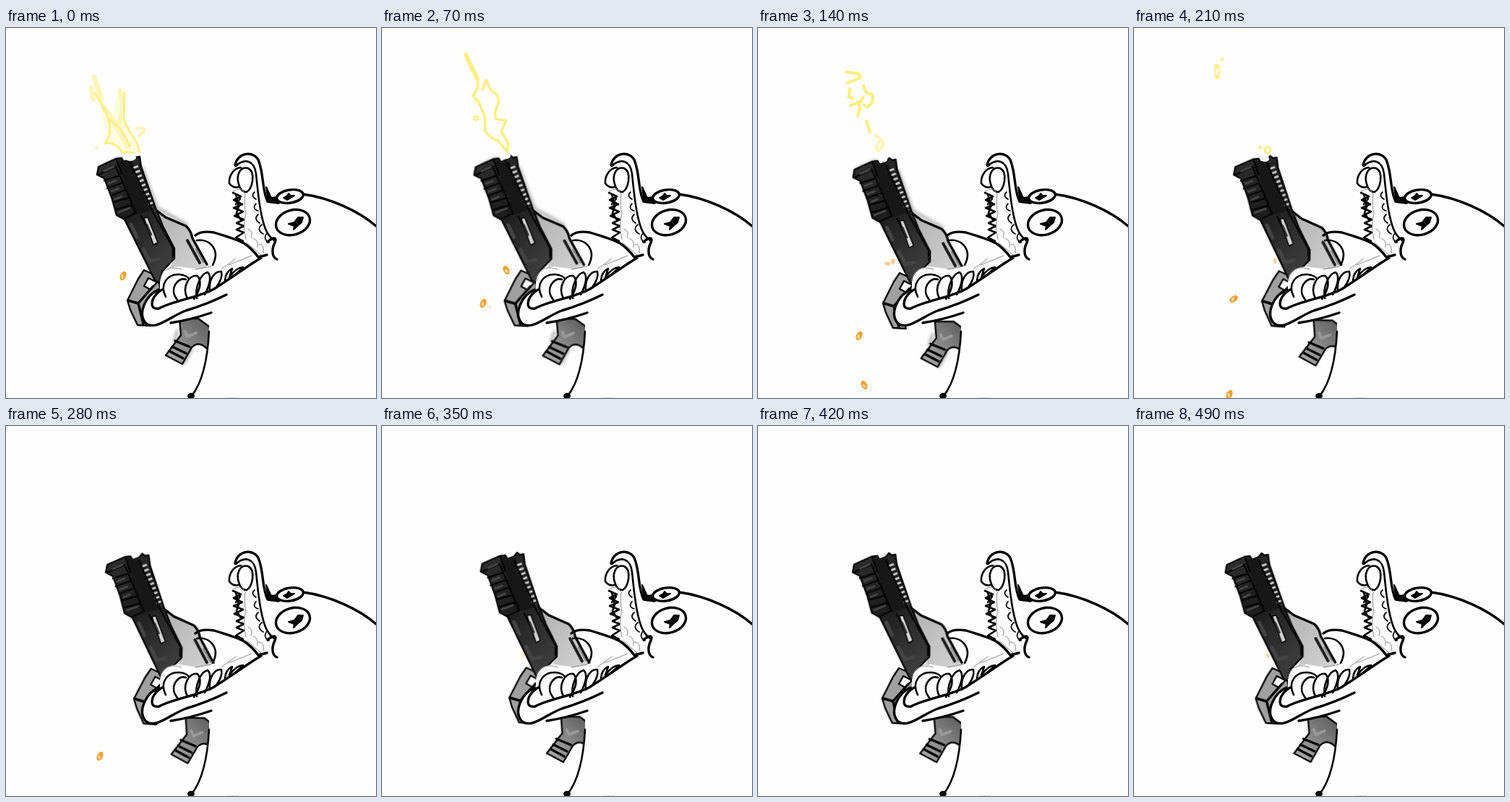
Animation, 512 px wide and 512 px high, one loop 560 ms. Source, as an HTML page:

```html
<!DOCTYPE html>
<html lang="en">
<head>
<meta charset="utf-8">
<title>Recoil</title>
<style>
html, body { margin: 0; width: 100%; height: 100%; overflow: hidden; background: #fefefe; }
svg { display: block; width: 100%; height: 100%; }
path, ellipse { stroke-linecap: round; stroke-linejoin: round; }

.ink { fill: none; stroke: #000; stroke-width: 3.4; }
.ink .mid { stroke-width: 2.6; }
.ink .small { stroke-width: 1.7; }
.ink .thin { stroke-width: 1; stroke: #888; }
.ink .solid { fill: #000; stroke-width: 2; }
.white, .ink .white { fill: #fefefe; }
.edge { stroke: #080808; stroke-width: 2.4; }

.gun { transform-origin: 200px 350px; animation: kick 560ms step-end infinite; }
@keyframes kick {
  0%    { transform: none; }
  12.5% { transform: translate(1.5px, .5px); }
  25%   { transform: translate(5px, 4px) rotate(.2deg); }
  37.5% { transform: translate(9.5px, 1.5px) rotate(1deg); }
  50%   { transform: translate(9.5px, 1px) rotate(1deg); }
  62.5% { transform: translate(8.5px, -.5px) rotate(.8deg); }
  75%   { transform: translate(4px, 0) rotate(.4deg); }
  87.5%, 100% { transform: translate(.5px, 0); }
}
.halo { animation: halo 560ms step-end infinite; }
@keyframes halo { 0% { visibility: visible; } 37.5%, 100% { visibility: hidden; } }

.beat { visibility: hidden; animation: beat 560ms step-end calc(var(--i) * 70ms - 560ms) infinite; }
@keyframes beat { 0% { visibility: visible; } 12.5%, 100% { visibility: hidden; } }

.fire { fill: none; stroke: #fcee84; stroke-width: 4.4; filter: url(#soft); }
.fire .pale { stroke: #fdf5b8; }
.fire .fill { fill: #fffbe0; stroke: none; }
.fire .flash { fill: #fff; stroke: none; }
.shell { fill: #f6a033; filter: url(#soft); }
</style>
</head>
<body>
<svg viewBox="0 0 512 512">
  <defs>
    <filter id="soft" x="-50%" y="-50%" width="200%" height="200%"><feGaussianBlur stdDeviation=".7"/></filter>
    <filter id="blur" x="-20%" y="-20%" width="140%" height="140%"><feGaussianBlur stdDeviation="2"/></filter>
    <linearGradient id="barrel" x1="0" y1="0" x2=".6" y2="1">
      <stop offset="0" stop-color="#303030"/><stop offset=".5" stop-color="#1d1d1d"/><stop offset="1" stop-color="#3b3b3b"/>
    </linearGradient>
    <linearGradient id="stock" x1="0" y1="0" x2=".7" y2="1">
      <stop offset="0" stop-color="#b0b0b0"/><stop offset="1" stop-color="#d2d2d2"/>
    </linearGradient>
    <linearGradient id="grip" x1="1" y1="0" x2="0" y2="1">
      <stop offset="0" stop-color="#555"/><stop offset=".5" stop-color="#858585"/><stop offset="1" stop-color="#b0b0b0"/>
    </linearGradient>
    <g id="casing"><ellipse rx="4" ry="6.5" transform="rotate(25)"/><ellipse cx="-1" cy="1" rx="1.6" ry="3" fill="#fbdc9a"/></g>
  </defs>

  <g class="gun">
    <g class="halo" fill="none" stroke="#888" stroke-width="4" opacity=".7" filter="url(#blur)">
      <path d="M137 188L158 180M188 193L209 249L250 272M237 420L233 434M246 464L257 444"/>
    </g>

    <!-- magazine -->
    <path class="edge" fill="#a0a0a0" d="M191 335L183 347L168 377L172 390L182 411L200 412L192 386L214 366L211 344Z"/>
    <path class="white edge" d="M197 346L191 357L200 362L209 352Z"/>
    <path class="ink mid" d="M169 377L183 381L204 357M183 381L190 409"/>

    <!-- grip -->
    <path fill="url(#grip)" class="edge" d="M240 402L242 425L221 453L244 465L257 442Q268 431 281 447L285 416L266 402Z"/>
    <path class="ink mid" d="M234 433L254 441M230 441L249 450M226 447L245 457"/>
    <path fill="none" stroke="#9a9a9a" stroke-width="4" d="M248 420L251 427L263 422"/>

    <!-- stock -->
    <path fill="url(#stock)" d="M205 250L221 262L251 275L258 291L279 327L270 346L218 352L233 318Z"/>
    <path class="ink mid" d="M205 250L221 262L249 274Q256 280 258 291L278 327"/>
    <path fill="none" stroke="#1b1b1b" stroke-width="4" d="M251 294L268 325"/>
    <path fill="none" stroke="#888" stroke-width="2.5" d="M263 306L273 324"/>

    <!-- barrel -->
    <path fill="url(#barrel)" class="edge" d="M126 203L128 192L152 181L160 180L163 185L172 181L176 176L180 179L185 178L187 192L207 249L217 274L233 305L233 319L216 337L212 353L206 349L191 319L164 265L153 259L146 234L136 208Z"/>
    <path fill="#171717" d="M155 183L174 184L203 251L176 259Z"/>
    <path fill="none" stroke="#c6c6c6" stroke-width="7" stroke-dasharray="3 3.8" style="stroke-linecap:butt" d="M179 191L202 248"/>
    <path fill="none" stroke="#050505" stroke-width="2.4" d="M128 203L152 192L180 256L163 264M136 211L157 204M140 222L161 214M145 232L166 224M149 241L170 235M153 251L174 245M172 187L204 256M153 182L160 202"/>
    <path fill="none" stroke="#484848" stroke-width="2.5" d="M136 198L149 192M142 215L152 211M146 226L156 222M151 237L160 233M156 255L171 249"/>
    <path fill="none" stroke="#444" stroke-width="5" d="M173 272L181 289M190 306L199 323L211 320"/>
    <path fill="none" stroke="#060606" stroke-width="2.5" d="M187 260L207 299M204 256L231 304L231 317"/>
    <path fill="#d6d6d6" stroke="#050505" stroke-width="1.5" d="M191 263L196 262L210 297L204 300Z"/>
    <path stroke="#333" stroke-width="2.5" d="M195 272L201 286"/>
  </g>

  <!-- lower jaw -->
  <path class="white" d="M213 349Q218 331 239 330L266 334L290 328L330 320L350 318L303 371L284 394L236 408Q207 416 194 409Q182 395 194 374L213 364Z"/>
  <g class="ink">
    <path d="M262 287Q270 280 288 283C303 288 320 292 331 299Q341 306 349 317L361 314"/>
    <path class="mid" d="M264 294C282 291 297 307 286 328"/>
    <path d="M353 318C330 332 312 346 288 361C264 374 232 377 212 388Q199 390 203 376Q207 367 216 362"/>
    <path d="M211 362C193 370 182 395 193 408C207 420 227 399 249 391Q279 382 305 369"/>
    <path d="M228 408Q255 404 284 394"/>
    <path class="thin" d="M214 350C213 335 227 328 243 334M262 334L284 330M299 333L318 319M308 328L340 315"/>
    <path class="mid" d="M221 372C212 354 224 340 240 341Q250 342 253 347M237 376C225 362 237 344 249 348M251 374C243 359 253 341 265 343Q274 354 260 375M264 374C261 360 269 340 279 338Q287 345 275 369M282 365C280 349 288 336 298 337Q300 346 292 357M303 349Q304 337 313 333L309 345Q319 331 328 331L318 341"/>
  </g>

  <!-- head -->
  <g class="ink">
    <path d="M317 190C320 171 345 169 350 185C357 204 354 224 362 240L377 242"/>
    <path class="mid" d="M318 191C331 179 344 184 346 202C349 232 352 260 359 278Q363 288 371 294"/>
    <path class="mid" d="M325 193C314 194 308 206 309 215Q314 222 322 220M323 219C317 204 324 191 335 194C346 200 341 222 333 227Q326 227 323 219"/>
    <path class="mid" d="M314 228L325 233L315 238L327 244L315 249L328 254L316 260L329 265L319 270L329 274L319 279L329 283L318 290L328 295M318 230L322 247L319 256L326 267M324 236L318 244"/>
    <path class="thin" d="M314 226Q327 218 330 229M331 229Q329 244 332 257Q327 272 332 292M335 278q8 3 4 12M342 291q8 2 6 13M350 299q8 0 6 12M333 297L353 314"/>
    <path class="small" d="M344 227q-6 5 2 10M346 243q-6 7 3 10M349 258q-7 6 2 12M354 272q-8 7 2 13M361 284q-6 8 3 13"/>
    <path d="M362 296C371 288 376 290 371 299C367 309 369 318 375 320"/>
    <path class="solid" d="M360 220L367 235L374 234L378 242L363 241Z"/>
    <path d="M411 230C449 235 489 254 512 274"/>
    <ellipse class="white" cx="393" cy="233" rx="18.5" ry="9" transform="rotate(-9 393 233)"/>
    <ellipse class="white" cx="397" cy="269" rx="24" ry="17" transform="rotate(-16 397 269)"/>
    <path class="solid" d="M391 271L399 269L404 262L411 262L409 269L403 274L398 279L399 274Z"/>
    <path class="solid" d="M384 235L389 232L391 229L394 232L399 232L394 235L389 238Z"/>
  </g>

  <!-- belly -->
  <path class="white" d="M281 404L281 421C279 457 272 490 257 509L320 509V396Z"/>
  <path class="ink" style="stroke-width:2.6" d="M281 420C279 457 272 490 257 509"/>
  <ellipse cx="256" cy="509" rx="5" ry="4"/>
  <path stroke="#ddd" d="M304 511.5H322"/>

  <g class="beat" style="--i:0">
    <g class="fire">
      <path class="fill" d="M128 98L146 125L155 86L166 88L163 128L184 170L172 181L142 160Z"/>
      <path class="pale" stroke-width="7" d="M122 68L132 99M118 83L121 99M158 87L162 108L157 130M136 110L153 135L168 163"/>
      <path d="M123 90C134 107 148 130 143 149L137 160Q151 156 161 172L176 172M164 90L163 127L171 143L180 157L185 171M143 126L158 139L172 164" stroke-width="3"/>
      <path class="pale" d="M181 139q11-3 10 4l-7 6M126 165l-1 1"/>
      <ellipse class="flash" cx="172" cy="179" rx="8" ry="5"/>
    </g>
    <g class="shell"><use href="#casing" x="162" y="343"/></g>
  </g>

  <g class="beat" style="--i:1">
    <g class="fire">
      <path stroke-width="6" d="M116 37L123 53L132 70"/>
      <path stroke-width="3.6" d="M132 69L133 82L126 94L134 103L142 122L143 143L150 151L161 156L173 171L175 160L165 143L172 128L158 126L156 117L162 101L159 92L151 87L144 72L139 85"/>
      <ellipse cx="130" cy="125" rx="2.6" ry="2.6" stroke-width="2.5"/>
      <ellipse class="flash" cx="172" cy="177" rx="6" ry="4"/>
    </g>
    <g class="shell"><use href="#casing" transform="translate(172 335) rotate(-55)"/><use href="#casing" x="140" y="381"/><ellipse cx="149" cy="386" rx="1" ry="3" fill="#fbd9ae"/></g>
  </g>

  <g class="beat" style="--i:2">
    <g class="fire">
      <path d="M122 61L139 63L142 69M124 76L138 70M127 84L126 96L131 97M146 80L150 90L158 92Q161 103 152 109L147 107M128 107L142 102L145 96M139 102L141 111L138 122M150 129L155 144"/>
      <path class="pale" d="M162 149q11 3 11 14l-6 7q-6-6 0-12"/>
      <ellipse class="flash" cx="173" cy="182" rx="6" ry="4"/>
    </g>
    <g class="shell"><use href="#casing" x="140" y="426"/><use href="#casing" transform="translate(147 494) rotate(-50)"/><g opacity=".5"><ellipse cx="179" cy="326" rx="4" ry="3"/><ellipse cx="187" cy="323" rx="3" ry="4"/></g></g>
  </g>

  <g class="beat" style="--i:3">
    <g class="fire">
      <ellipse class="pale" cx="115" cy="60" rx="3" ry="9"/>
      <path d="M122 43v1M114 52v2M115 67v1M174 165v1"/>
      <ellipse cx="185" cy="169" rx="4" ry="4" stroke-width="3"/>
      <ellipse class="flash" cx="181" cy="181" rx="6" ry="4"/>
    </g>
    <g class="shell"><use href="#casing" transform="translate(138 375) rotate(30)"/><use href="#casing" x="132" y="507"/><ellipse cx="195" cy="322" rx="2" ry="4" opacity=".5"/></g>
  </g>

  <g class="beat" style="--i:4">
    <g class="shell"><use href="#casing" x="130" y="457"/></g>
  </g>
  <g class="beat" style="--i:5">
    <g class="shell"><ellipse cx="195" cy="317" rx="2" ry="3" fill="#f8e07a" opacity=".5"/></g>
  </g>
  <g class="beat" style="--i:7">
    <g class="shell"><ellipse cx="185" cy="318" rx="2" ry="3" opacity=".5"/></g>
  </g>
</svg>
</body>
</html>
```
